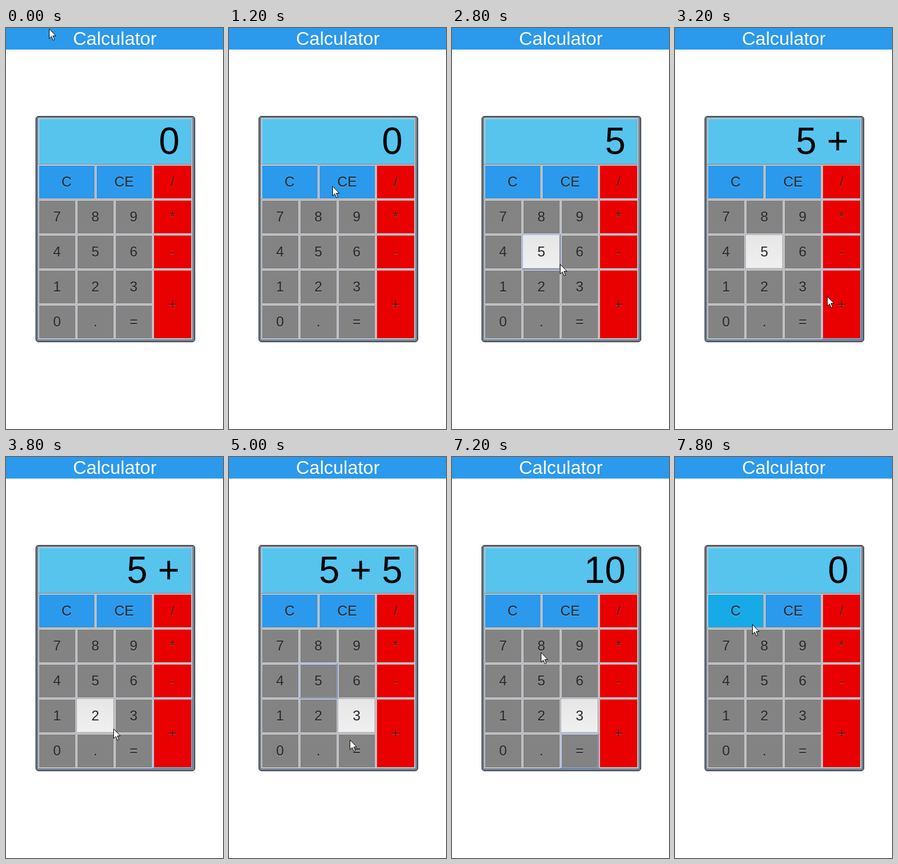
Recreate the animation shown at these times as an HTML page. Size 374 px wide and 688 px high, loop 8000 ms.

```html
<!DOCTYPE html>
<html lang="en">
<head>
<meta charset="utf-8">
<title>Calculator</title>
<style>
  html, body { margin: 0; width: 100%; height: 100%; overflow: hidden; background: #fff; }
  body { position: relative; font-family: "Liberation Sans", Arial, sans-serif; }
  h1 {
    position: absolute; left: 0; top: 0; width: 374px; height: 37px; margin: 0;
    background: #2b99ec; color: #fff; font-size: 32px; font-weight: 400;
    line-height: 36px; text-align: center; text-indent: 1px;
  }
  #case {
    position: absolute; left: 51px; top: 151px; width: 273px; height: 386px;
    border: 1px solid #16191c; border-radius: 5px; background: #708090;
  }
  #screen, .key { position: absolute; box-sizing: border-box; border: 2px groove #e6e9ed; }
  #screen {
    left: 55px; top: 154px; width: 266px; height: 81px; padding-right: 20px;
    background: #57c4ee; color: #000; font-size: 64px; line-height: 77px;
    text-align: right; white-space: pre;
  }
  .key {
    display: flex; align-items: center; justify-content: center;
    color: #262626; font-size: 24px; line-height: 28px;
    text-shadow: 0 1px 1px rgba(255, 255, 255, .25);
  }
  .num { background: #838383; }
  .clear { background: #2b99ec; }
  .op { background: #e90000; color: #4a1c1c; }
  .num.hover { background: linear-gradient(#e6e6e6, #f0f0f0); }
  .clear.hover { background: #16abe6; }
  .op.hover { background: #f52020; }
  .focus { outline: 1px solid #7f9be0; outline-offset: -1px; }
  .clear.focus { outline: 1px dotted #b9c8f5; }
  #cursor { position: absolute; left: 0; top: 0; overflow: visible; }
</style>
</head>
<body>
<h1>Calculator</h1>
<div id="case"></div>
<div id="screen">0</div>
<svg id="cursor" width="13" height="21">
  <path d="M.5 .5V17L4.3 13.4L7.2 20L9.7 19L6.9 12.5H12Z" fill="#fff" stroke="#000"/>
</svg>
<script>
const LOOP = 8000, STEP = 200;
const LEFT = 55, TOP = 234, COL = 66, ROW = 60;
const screen = document.getElementById('screen');
const cursor = document.getElementById('cursor');
const keys = [];

function addKey(label, type, col, row, cols = 1, rows = 1) {
  const box = { left: LEFT + col * COL, top: TOP + row * ROW, width: cols * COL, height: rows * ROW };
  const node = document.createElement('div');
  node.className = 'key ' + type;
  node.textContent = label;
  for (const side in box) node.style[side] = box[side] + 'px';
  document.body.insertBefore(node, cursor);
  keys.push({ label, node, ...box });
}

addKey('C', 'clear', 0, 0, 1.5);
addKey('CE', 'clear', 1.5, 0, 1.5);
['789', '456', '123', '0.='].forEach((line, row) =>
  [...line].forEach((label, col) => addKey(label, 'num', col, row + 1)));
['/', '*', '-'].forEach((label, row) => addKey(label, 'op', 3, row, 1.03));
addKey('+', 'op', 3, 3, 1.03, 2);

// Where the pointer rests; a stop with a key presses it.
const stops = [
  { time: 0, x: 74, y: 1, key: 'C', text: '0' },
  { time: 1600, x: 202, y: 334 },
  { time: 2400, x: 163, y: 388, key: '5', text: '5' },
  { time: 2800, x: 186, y: 405 },
  { time: 3200, x: 262, y: 460, key: '+', text: '5 +' },
  { time: 3600, x: 185, y: 466 },
  { time: 4400, x: 172, y: 390, key: '5', text: '5 + 5' },
  { time: 5000, x: 208, y: 485 },
  { time: 6000, x: 222, y: 498, key: '=', text: '10' },
  { time: 6600, x: 232, y: 512 },
  { time: 7400, x: 127, y: 276, key: 'C', text: '0' },
  { time: 7800, x: 133, y: 287 }
];

const latest = (list, time) => list.filter(stop => stop.time <= time).pop();
const ease = part => (1 - Math.cos(Math.PI * part)) / 2;

// Each rest lasts one step, then the pointer glides to the next stop.
function pointerAt(time) {
  const from = latest(stops, time);
  const to = stops[stops.indexOf(from) + 1] || from;
  const leave = from.time + STEP;
  const part = time <= leave ? 0 : ease((time - leave) / (to.time - leave));
  const mix = axis => Math.round(from[axis] + (to[axis] - from[axis]) * part);
  return { x: mix('x'), y: mix('y') };
}

const contains = (key, { x, y }) =>
  x >= key.left && x < key.left + key.width && y >= key.top && y < key.top + key.height;

function draw(time) {
  const { x, y } = pointerAt(time);
  const hoverPoint = pointerAt(Math.max(0, time - STEP)); // highlight trails the pointer
  const press = latest(stops.filter(stop => stop.key), time);
  cursor.style.transform = `translate(${x}px, ${y}px)`;
  screen.textContent = press.text;
  for (const key of keys) {
    key.node.classList.toggle('hover', contains(key, hoverPoint));
    key.node.classList.toggle('focus', key.label === press.key);
  }
}

const start = performance.now();
function tick() {
  const time = (performance.now() - start) % LOOP;
  draw(Math.floor(time / STEP) * STEP);
  requestAnimationFrame(tick);
}
tick();
</script>
</body>
</html>
```
